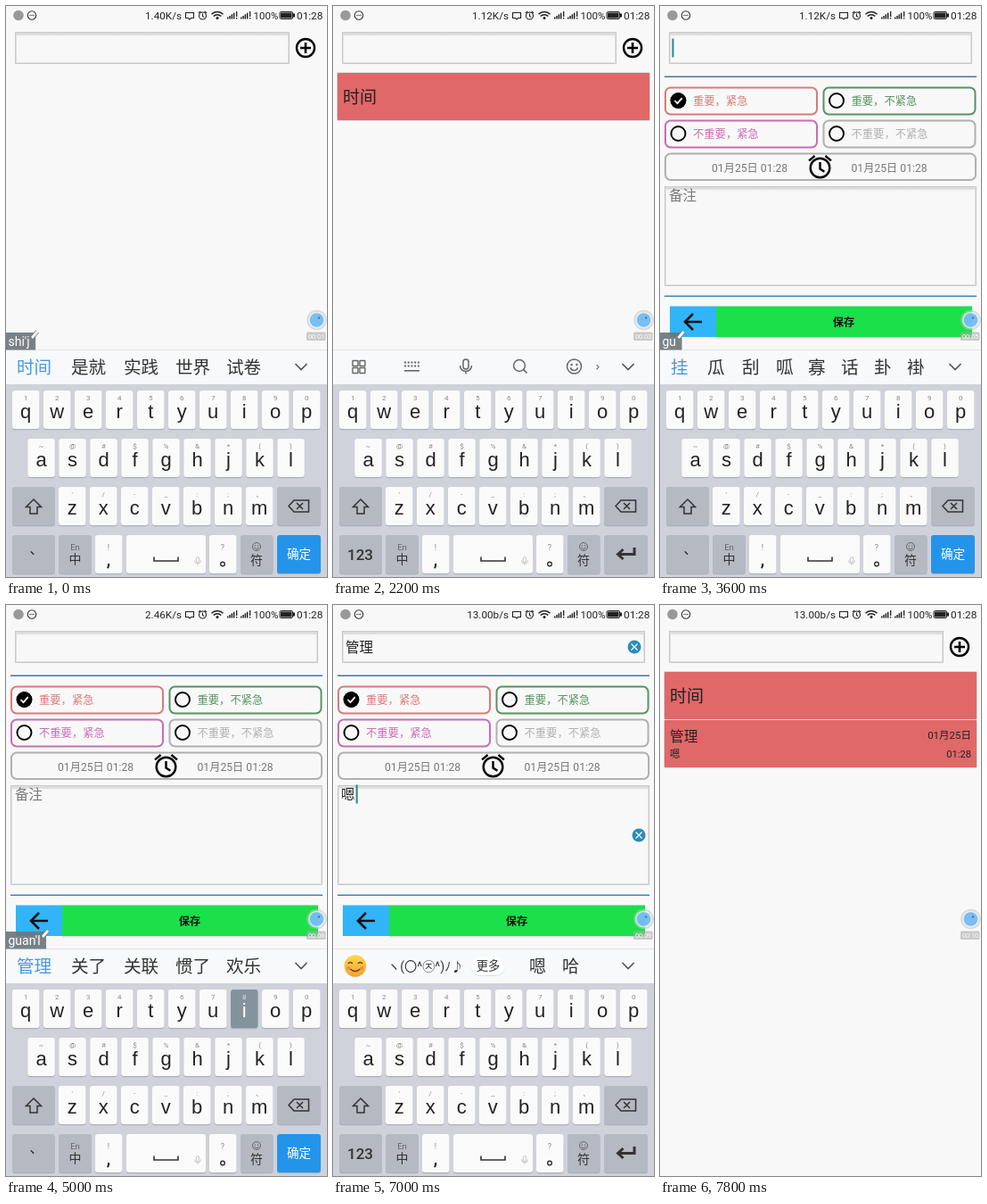
Write an HTML page with a canvas that moves like this. It is 360 px wide and 640 px high and loops after 8 s.

```html
<!DOCTYPE html>
<html lang="zh-CN">
<head>
<meta charset="utf-8">
<title>待办清单</title>
<style>
html, body { margin: 0; width: 100%; height: 100%; overflow: hidden; background: #f8f8f8; }
canvas { display: block; width: 360px; height: 640px; }
</style>
</head>
<body>
<canvas id="stage"></canvas>
<script>
const STEP = 200, LOOP = 8000;
const SANS = 'Roboto, "Noto Sans CJK SC", "Noto Sans CJK", sans-serif';
const KEYS = '"Liberation Sans", Arial, sans-serif';
const BG = '#f8f8f8', INK = '#222', GREY = '#666', BLUE = '#4a98e0';
const cv = document.getElementById('stage'), c = cv.getContext('2d');
const ratio = window.devicePixelRatio || 1;
cv.width = 360 * ratio;
cv.height = 640 * ratio;

// Each entry changes part of the state from its step on.
const script = [
  [0, { page: 0, fade: 1, net: '1.40K/s', comp: "shi'j", cands: '时间 是就 实践 世界 试卷',
        key: '', pop: true, title: '', note: '', focus: 'title', items: 0, kb: true }],
  [1, { comp: "shi'ji", key: 'i', cands: '时间 世纪 实际 时机 事迹' }],
  [2, { comp: "shi'jia", key: 'a', cands: '时间 是家 市价 世家 施加' }],
  [3, { comp: "shi'jian", key: 'n', cands: '时间 事件 实践 是件 试剑' }],
  [4, { comp: '', key: '', title: '时间' }],
  [7, { title: '', items: 1, net: '1.12K/s' }],
  [12, { page: 1, fade: 0.5 }],
  [13, { fade: 1 }],
  [16, { key: 'g' }],
  [17, { comp: 'g', key: 'u', cands: '个 给 过 刚 该 跟 高 更' }],
  [18, { comp: 'gu', key: '', cands: '挂 瓜 刮 呱 寡 话 卦 褂' }],
  [20, { comp: 'gua', key: 'a', net: '2.46K/s' }],
  [21, { comp: 'guan', key: 'n', cands: '管 关 观 官 惯 馆 灌 贯' }],
  [22, { key: '' }],
  [23, { comp: "guan'l", key: 'l', cands: '管理 关了 关联 惯了 欢乐' }],
  [24, { key: '' }],
  [25, { key: 'i', pop: false }],
  [26, { comp: "guan'li", key: '', pop: true, cands: '管理 惯例 官吏 关里 馆里' }],
  [27, { comp: '', title: '管理' }],
  [28, { focus: 'note' }],
  [29, { key: 'e' }],
  [30, { comp: 'e', key: '', cands: '呃 额 饿 嗯 恶 鹅 俄 二' }],
  [31, { comp: 'en', key: 'n', net: '13.00b/s', cands: '嗯 恩 摁 嗯嗯 恩恩' }],
  [32, { key: '' }],
  [34, { comp: '', note: '嗯' }],
  [36, { kb: false }],
  [38, { page: 0, title: '', items: 2, focus: '' }]
];
const stateAt = n => Object.assign({}, ...script.filter(e => e[0] <= n).map(e => e[1]));

// y is the visual middle of the line
function text(s, x, y, size, color = INK, align = 'left', weight = 400, font = SANS) {
  c.font = `${weight} ${size}px ${font}`;
  c.textAlign = align;
  c.fillStyle = color;
  c.fillText(s, x, y + size * 0.37);
}
function rect(x, y, w, h, color, r = 0) {
  c.beginPath();
  c.roundRect(x, y, w, h, r);
  c.fillStyle = color;
  c.fill();
}
function frame(x, y, w, h, color, r = 0, lw = 1) {
  c.beginPath();
  c.roundRect(x, y, w, h, r);
  c.strokeStyle = color;
  c.lineWidth = lw;
  c.stroke();
}
function disc(x, y, r, color) {
  c.beginPath();
  c.arc(x, y, r, 0, 7);
  c.fillStyle = color;
  c.fill();
}
function ring(x, y, r, color, lw = 1.5) {
  c.beginPath();
  c.arc(x, y, r, 0, 7);
  c.strokeStyle = color;
  c.lineWidth = lw;
  c.stroke();
}
function path(d, color, lw = 1.5, x = 0, y = 0) {
  c.save();
  c.translate(x, y);
  c.strokeStyle = color;
  c.lineWidth = lw;
  c.stroke(new Path2D(d));
  c.restore();
}

function smiley(x, y, r, color, lw) {
  ring(x, y, r, color, lw);
  disc(x - r * .36, y - r * .25, r * .15, color);
  disc(x + r * .36, y - r * .25, r * .15, color);
  c.beginPath();
  c.arc(x, y + r * .05, r * .52, .2, Math.PI - .2);
  c.stroke();
}
function mic(x, y, k, color) {
  c.save();
  c.translate(x, y);
  c.scale(k, k);
  frame(-3, -8, 6, 11, color, 3, 1.5);
  path('M-6.5-1a6.5 6.5 0 0 0 13 0M0 5.5V8.5', color);
  c.restore();
}
function alarm(x, y, r, color, lw) {
  ring(x, y, r, color, lw);
  path(`M0 ${-r * .6}V${r * .1}L${r * .45} ${r * .4}M${-r * 1.15} ${-r * .75}L${-r * .55} ${-r * 1.25}M${r * 1.15} ${-r * .75}L${r * .55} ${-r * 1.25}`, color, lw, x, y);
}
function clearMark(x, y) {
  disc(x, y, 7.5, '#2b8cb8');
  path('M-3.5-3.5L3.5 3.5M3.5-3.5L-3.5 3.5', '#fff', 1.1, x, y);
}

function statusBar(net) {
  disc(14, 10.5, 5.8, '#999');
  ring(29, 10.5, 4.7, '#333', 1.1);
  [-2, 0, 2].forEach(d => disc(29 + d, 10.5, .7, '#333'));
  text(net, 197, 10.5, 11.7, INK, 'right');
  path('M201.5 7.5h9v6h-3l-1.5 1.5l-1.5-1.5h-3z', INK, 1.1);
  alarm(220.5, 11, 4, INK, 1.1);
  path('M230.5 9.3a9 9 0 0 1 13 0M232.7 11.5a6 6 0 0 1 8.6 0', INK, 1.5);
  disc(237, 13.6, 1.5, INK);
  for (const x of [248, 263]) {
    for (let i = 0; i < 4; i++) rect(x + i * 2.3, 12.5 - i * 1.6, 1.5, 2 + i * 1.6, INK);
    rect(x + 10, 6, 1.3, 6, INK);
    rect(x + 10, 13, 1.3, 1.5, INK);
  }
  text('100%', 277.5, 10.5, 11.5);
  frame(307, 6.5, 14.5, 8, INK, 1.5);
  rect(308, 7.5, 12.5, 6, INK);
  rect(322, 8.5, 2, 4, INK);
  text('01:28', 326, 10.5, 11.8);
}

function inset(x, y, w, h) {
  const g = c.createLinearGradient(0, y, 0, y + 5);
  g.addColorStop(0, '#b8b8b8');
  g.addColorStop(1, BG);
  rect(x, y, w, h, BG);
  rect(x, y, w, 5, g);
  frame(x + .5, y + .5, w - 1, h - 1, '#cacaca');
  frame(x + 1.5, y + 1.5, w - 3, h - 3, '#dedede');
}
function caret(x, y) {
  rect(x, y - 10.5, 2, 21, '#258a86');
}
function titleBox(s, w, blink) {
  inset(10, 29, w, 36);
  text(s.title, 14, 47, 15.5);
  if (s.title) clearMark(w - 2, 47);
  if (blink && s.focus === 'title') caret(s.title ? 46 : 13.5, 47);
}

function card(y) {
  rect(4, y - 1, 352, 55, '#dcdcdc', 2);
  rect(5, y, 350, 53, '#e06868', 1);
}
function listPage(s, blink) {
  titleBox(s, 308, blink);
  ring(336, 47, 10, '#000', 2.4);
  path('M330 47h12M336 41v12', '#000', 2.6);
  if (s.items > 0) {
    card(75);
    text('时间', 11, 101.5, 19);
  }
  if (s.items > 1) {
    card(129);
    text('管理', 11, 147, 15.7);
    text('嗯', 11, 167, 11.5);
    text('01月25日', 349, 145.5, 11.5, INK, 'right');
    text('01:28', 349, 167, 11.2, INK, 'right');
  }
}

function choice(x, y, label, color, on) {
  frame(x + 1, y + 1, 170, 30, color, 6, 2);
  ring(x + 15.5, y + 15.5, 8, '#000', 1.9);
  if (on) {
    disc(x + 15.5, y + 15.5, 8.7, '#000');
    path('M-4 0l3 3.2l5.3-6', '#fff', 1.8, x + 15.5, y + 15.5);
  }
  text(label, x + 32, y + 15.5, 12.3, color);
}
function editPage(s, blink) {
  const foot = s.kb ? 385 : 640;
  titleBox(s, 340, blink);
  rect(5, 78.5, 350, 1.4, '#4a72a4');
  choice(5, 90.5, '重要，紧急', '#d97a7a', true);
  choice(182.5, 90.5, '重要，不紧急', '#549561');
  choice(5, 127.5, '不重要，紧急', '#c86cb4');
  choice(182.5, 127.5, '不重要，不紧急', '#b0b0b0');
  frame(6, 165.5, 348, 29.5, '#b0b0b0', 6, 2);
  text('01月25日 01:28', 58, 181, 12.2, '#777');
  text('01月25日 01:28', 214.5, 181, 12.2, '#777');
  alarm(179.5, 181.5, 10.8, '#000', 2.4);

  const h = foot - 71 - 202;
  inset(5, 202, 350, h);
  text(s.note || '备注', s.note ? 9 : 10, 212, 15.5, s.note ? INK : '#777');
  if (s.note) clearMark(343, 202 + h / 2);
  if (blink && s.focus === 'note') caret(s.note ? 25.7 : 8.5, 212);

  rect(5, foot - 60.5, 350, 1.4, '#3f87b5');
  rect(63, foot - 14, 287, 1.5, '#dedede');
  rect(11, foot - 48.5, 52, 34.5, '#31b5f8');
  rect(63, foot - 48.5, 287, 34.5, '#1be04a');
  path('M47 0H29M37-9L28 0L37 9', '#111', 2.6, 0, foot - 31);
  text('保存', 206, foot - 31, 12.2, '#111', 'center', 700);
}

function bubble(t) {
  disc(348.5, 352, 11.3, 'rgba(190,195,195,.55)');
  disc(348.5, 352, 9.5, 'rgba(245,248,250,.65)');
  disc(348.5, 352, 7.8, 'rgba(92,178,245,.8)');
  disc(351, 349.5, 1.3, '#4a7fa8');
  rect(337, 365.5, 21.5, 9.5, 'rgba(170,170,170,.6)', 1.5);
  const sec = Math.floor(1.2 + t * 1.15 / 1000);
  text('00:' + String(sec).padStart(2, '0'), 348, 370.3, 7.3, '#fff', 'center');
}

const rows = [
  { keys: 'qwertyuiop', hints: '1234567890', x: 7, y: 431 },
  { keys: 'asdfghjkl', hints: '~@#$%&*()', x: 24.3, y: 485 },
  { keys: 'zxcvbnm', hints: '′/-_:;、', x: 59, y: 539 }
];
function keyBox(x, y, w, color = '#fafafa') {
  rect(x, y + 1.3, w, 43, '#abb0b9', 3);
  rect(x, y, w, 43, color, 3);
}
function keyboard(s) {
  rect(0, 424, 360, 216, '#cfd2da');
  const dark = '#b5b9c2';
  for (const r of rows) [...r.keys].forEach((k, i) => {
    const x = r.x + i * 35, on = k === s.key;
    keyBox(x, r.y, 30.5, on ? '#84939c' : '#fafafa');
    text(r.hints[i], x + 15.2, r.y + 8, 8, on ? '#dde3e6' : '#888', 'center');
    text(k, x + 15.2, r.y + 22.8, 22, on ? '#fff' : INK, 'center', 400, KEYS);
  });
  keyBox(7, 539, 48, dark);
  path('M31 553l8.5 8.5h-4.5v7.5h-8v-7.5h-4.5z', '#333');
  keyBox(304, 539, 49, dark);
  path('M323 554h16.500v13h-16.500l-6-6.500zM326 557l7 7M333 557l-7 7', '#333', 1.5);

  keyBox(7, 593, 48, dark);
  if (s.comp) text('、', 34, 608, 15, INK, 'center');
  else text('123', 30.5, 614.5, 17, '#333', 'center', 500);
  keyBox(59, 593, 37, dark);
  text('En', 77.5, 606, 9.5, '#666', 'center');
  text('中', 77.5, 620, 14, '#333', 'center');
  keyBox(100, 593, 30.5);
  text('!', 115, 607, 9, '#888', 'center');
  text(',', 115, 620, 20, INK, 'center', 500);
  keyBox(135, 593, 89);
  path('M166 617.500v4.500h27v-4.500', '#333', 1.6);
  mic(215, 622, .55, '#bbb');
  keyBox(228, 593, 30.5);
  text('?', 243, 607, 9, '#888', 'center');
  ring(243, 625.5, 2.3, INK, 1.3);
  keyBox(263, 593, 36.5, dark);
  smiley(281, 606, 4.5, '#666', 1);
  text('符', 281, 620.5, 14, '#333', 'center');
  keyBox(304, 593, 49, s.comp ? '#2494ea' : dark);
  if (s.comp) text('确定', 328.5, 614, 13.6, '#fff', 'center');
  else path('M338 607v7.500h-17M325.500 609l-6 5.500l6 5.500', '#333', 3);
}

function toolbar() {
  for (const x of [22, 30]) for (const y of [397.5, 405.5]) frame(x, y, 6, 6, GREY, .5, 1.4);
  for (let r = 0; r < 2; r++) for (let i = 0; i < 5; i++)
    rect(80 + i * 3.7, 398.5 + r * 4, 2, 2, GREY);
  rect(80, 408, 17, 1.6, GREY);
  mic(149, 404, 1, GREY);
  ring(209, 403, 6.4, GREY);
  path('M213.500 407.500l4 4', GREY, 1.7);
  smiley(270.5, 404, 8, GREY, 1.5);
  path('M295.500 402l2.500 2.700l-2.500 2.700', GREY, 1.1);
}
function faces() {
  const g = c.createLinearGradient(0, 392, 0, 417);
  g.addColorStop(0, '#ffd94e');
  g.addColorStop(1, '#f2a233');
  disc(25, 404.5, 12.3, g);
  path('M17 402q2.500-3 5 0M28 402q2.500-3 5 0M19.500 408q5.500 5 11 0', '#70401c', 1.5);
  disc(17.5, 407, 2, '#f48a4c');
  disc(32.5, 407, 2, '#f48a4c');
  text('ヽ(〇^㉨^)ﾉ♪', 61, 404.5, 14.2, '#333');
  rect(155, 395, 38, 21, '#dcdfe3', 10);
  rect(155, 394, 38, 21, '#fff', 10);
  text('更多', 174, 404.5, 13.3, '#333', 'center');
  text('嗯', 220, 404.5, 19, '#333');
  text('哈', 257, 404.5, 19, '#333');
}
function candidates(s) {
  const list = s.cands.split(' ');
  const xs = list.length > 5 ? [12, 53, 92, 130, 166, 203, 240, 277] : [12, 73, 132, 190, 247];
  list.forEach((w, i) => text(w, xs[i], 404.5, 19.6, i ? '#333' : BLUE));
  c.font = `14px ${SANS}`;
  const w = c.measureText(s.comp).width + 9;
  rect(0, 366, w, 19.5, 'rgba(108,117,125,.9)');
  text(s.comp, 2.5, 376, 14, '#fff');
  path('M-3 4L3-3', '#777', 4.6, w - 1, 368);
  path('M-3 4L3-3', '#fff', 2.8, w - 1, 368);
}
function popup(k) {
  const row = rows.find(r => r.keys.includes(k));
  const x = row.x + row.keys.indexOf(k) * 35 + 15.2, y = row.y - 61;
  const left = Math.min(Math.max(x - 24, 2), 310);
  c.save();
  c.shadowColor = 'rgba(0,0,0,.35)';
  c.shadowBlur = 4 * ratio;
  c.shadowOffsetY = ratio;
  c.beginPath();
  c.roundRect(left, y, 48, 46, 3);
  c.moveTo(x - 8, y + 45);
  c.lineTo(x + 8, y + 45);
  c.lineTo(x, y + 54);
  c.closePath();
  c.fillStyle = '#fafafa';
  c.fill();
  c.restore();
  text(k, left + 24, y + 21.5, 25, '#3c92e0', 'center', 400, KEYS);
}
function inputPanel(s) {
  rect(0, 385, 360, 39, '#f7f9fa');
  rect(0, 385, 360, 1, '#dfe2e5');
  keyboard(s);
  if (s.comp) candidates(s);
  else if (s.note) faces();
  else toolbar();
  path('M324.500 401l6.500 6.500l6.500-6.500', '#555', 1.7);
  if (s.key && s.pop) popup(s.key);
}

function draw(n) {
  const s = stateAt(n);
  const blink = n % 5 > 2 || n === 4 || n === 27 || n === 34 || n === 35;
  c.setTransform(ratio, 0, 0, ratio, 0, 0);
  c.globalAlpha = 1;
  rect(0, 0, 360, 640, BG);
  if (!s.page || s.fade < 1) listPage(s, blink);
  if (s.page) {
    c.globalAlpha = s.fade;
    rect(0, 22, 360, 618, BG);
    editPage(s, blink);
    c.globalAlpha = 1;
  }
  statusBar(s.net);
  bubble(n * STEP);
  if (s.kb) inputPanel(s);
}

let shown = -1;
function tick() {
  const n = Math.floor(performance.now() % LOOP / STEP);
  if (n !== shown) draw(shown = n);
  requestAnimationFrame(tick);
}
tick();
</script>
</body>
</html>
```
